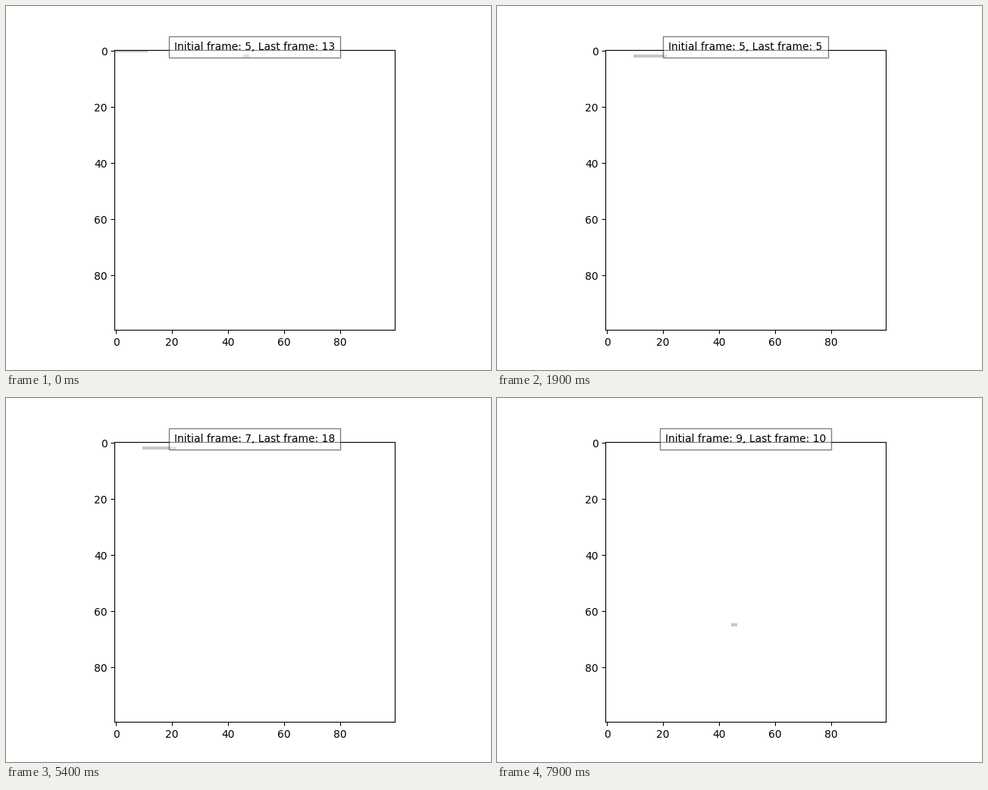
A matplotlib script that plays this animation: 640 px wide and 480 px high, repeating every 8 s.

```python
import matplotlib.pyplot as plt
import numpy as np
from matplotlib.animation import FuncAnimation
from matplotlib.colors import ListedColormap

plt.rcParams["text.kerning_factor"] = 6

SIZE = 100      # the signal is folded into SIZE rows of SIZE samples
PERIOD = 246    # samples between repeated bursts
LATE = 8800     # from here on bursts repeat until the signal ends
FRAMES = 80

# last step of each sweep down the signal, and the sample it reaches
SWEEP_ENDS = [9, 18, 30, 44, 53, 69, 79]
SWEEP_STOPS = [9097, 8300, 8842, 9735, 7300, 9240, 6545]

# key points of the two counters in the label
LABEL_STEPS = [0, 9, 19, 30, 44, 64, 79]
INITIAL = [5, 2, 5, 4, 7, 7, 9]
LAST = [13, 42, 5, 6, 23, 13, 10]


def lead_sample(step):
    """Position of the first burst, moving evenly along the current sweep."""
    k = int(np.searchsorted(SWEEP_ENDS, step))
    start, top = (SWEEP_ENDS[k - 1] + 1, 210) if k else (0, 0)
    return round(np.interp(step, [start, SWEEP_ENDS[k]], [top, SWEEP_STOPS[k]]))


def burst_length(pos):
    if pos < PERIOD:
        return 12
    return 5 if pos >= LATE else 2


def make_image(step):
    signal = np.zeros(SIZE * SIZE)
    lead = lead_sample(step)
    starts = range(lead, signal.size, PERIOD)
    if lead < LATE:
        starts = starts[:2 if step % 5 == 0 else 1]
    for pos in starts:
        signal[pos:pos + burst_length(pos)] = 1
    return signal.reshape(SIZE, SIZE)


def counter(step, values):
    return round(np.interp(step, LABEL_STEPS, values))


fig, ax = plt.subplots(figsize=(6.4, 4.8), dpi=100)
image = ax.imshow(np.zeros((SIZE, SIZE)), vmin=0, vmax=1,
                  cmap=ListedColormap(["white", "#c6c6c6"]),
                  interpolation="nearest")
label = ax.text(0.5, 1.0, "", transform=ax.transAxes, ha="center",
                bbox={"facecolor": "white", "alpha": 0.5, "pad": 5})


def update(step):
    image.set_data(make_image(step))
    label.set_text(f"Initial frame: {counter(step, INITIAL)}, "
                   f"Last frame: {counter(step, LAST)}")
    return image, label


anim = FuncAnimation(fig, update, frames=FRAMES, interval=100,
                     repeat=True, repeat_delay=0, blit=False)
plt.show()
```
